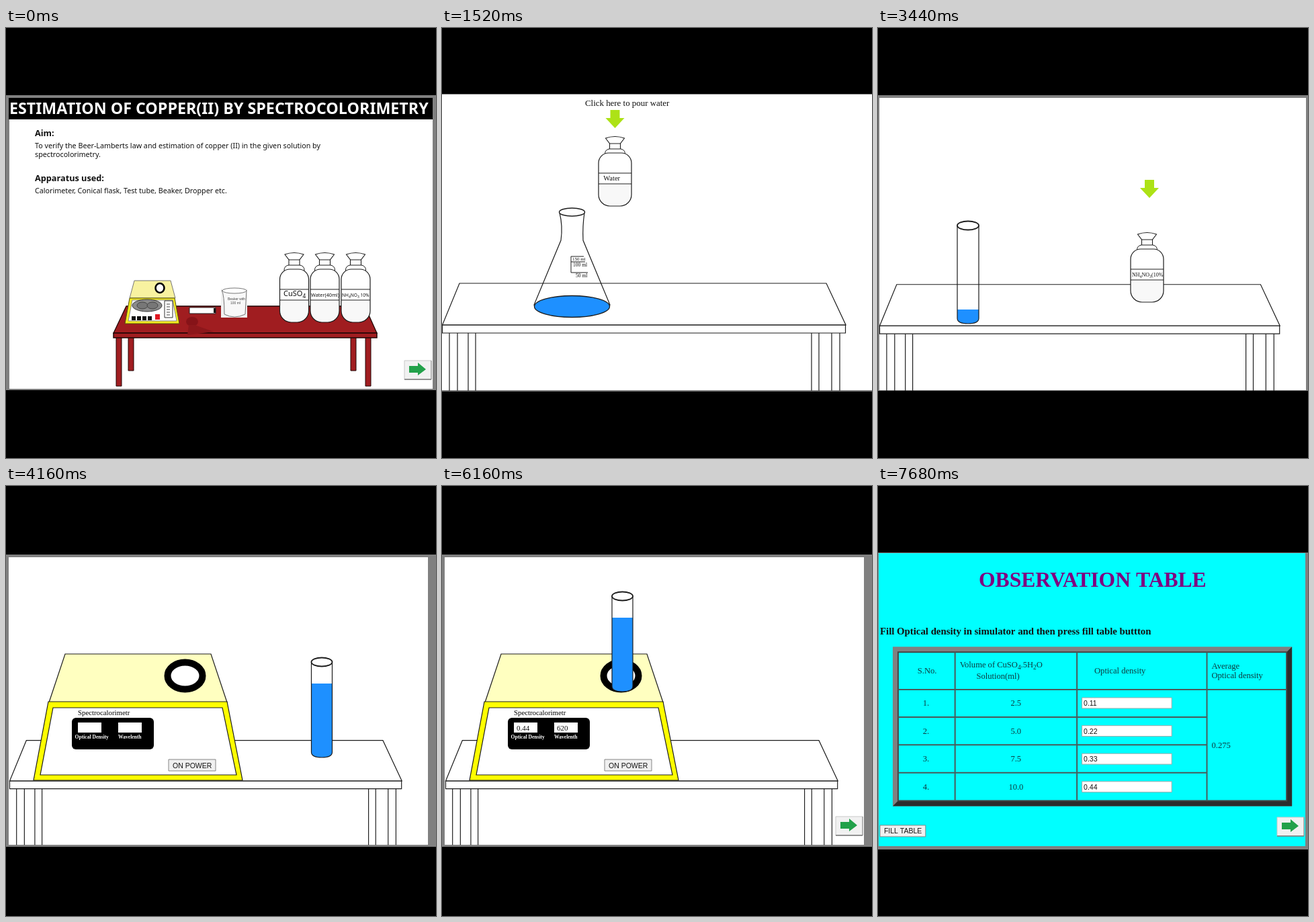
An HTML page with a canvas for the animation above (8000 ms loop, 640 by 640 pixels).

```html
<!DOCTYPE html>
<html lang="en">
<head>
<meta charset="utf-8">
<title>Spectrocolorimetry experiment</title>
<style>
html, body { margin: 0; width: 100%; height: 100%; overflow: hidden; background: #000; }
canvas { display: block; width: 640px; height: 640px; }
</style>
</head>
<body>
<canvas id="stage" width="640" height="640"></canvas>
<script>
const ctx = document.getElementById('stage').getContext('2d');
const SERIF = '"Liberation Serif", serif';
const SANS = '"Liberation Sans", sans-serif';
const NOTO = '"Noto Sans", sans-serif';
const BLUE = '#1e90ff', GRAY = '#808080', INK = '#1c1c1c';

function paint(fill, stroke, width = 1) {
  if (fill) { ctx.fillStyle = fill; ctx.fill(); }
  if (stroke) { ctx.strokeStyle = stroke; ctx.lineWidth = width; ctx.stroke(); }
}
function rect(x, y, w, h, fill, stroke, width) {
  ctx.beginPath(); ctx.rect(x, y, w, h); paint(fill, stroke, width);
}
function round(x, y, w, h, r, fill, stroke, width) {
  ctx.beginPath(); ctx.roundRect(x, y, w, h, r); paint(fill, stroke, width);
}
function poly(points, fill, stroke, width) {
  ctx.beginPath();
  points.forEach(([x, y]) => ctx.lineTo(x, y));
  ctx.closePath(); paint(fill, stroke, width);
}
function oval(x, y, rx, ry, fill, stroke, width) {
  ctx.beginPath(); ctx.ellipse(x, y, rx, ry, 0, 0, 7); paint(fill, stroke, width);
}
function line(x1, y1, x2, y2, color = INK, width = 1) {
  ctx.beginPath(); ctx.moveTo(x1, y1); ctx.lineTo(x2, y2); paint(null, color, width);
}
// "_4" sets the digit as a subscript.
function text(str, x, y, size, family, color = '#111', weight = '') {
  ctx.fillStyle = color;
  str.split(/_(\d)/).forEach((part, i) => {
    const sub = i % 2;
    ctx.font = `${weight} ${sub ? size * 0.75 : size}px ${family}`;
    ctx.fillText(part, x, y + (sub ? size * 0.25 : 0));
    x += ctx.measureText(part).width;
  });
}

// A page with a gray surround; the margins are the gray above and below it.
function windowArea(left, top, right, bottom, above, below, color = '#fff') {
  rect(0, top - above, 640, bottom - top + above + below, GRAY);
  rect(left, top, right - left, bottom - top, color);
}
function pointer(x, y, down = true) {
  const d = down ? 1 : -1;
  poly([[-7, 0], [7, 0], [7, 12], [14, 12], [0, 27], [-14, 12], [-7, 12]]
    .map(([dx, dy]) => [x + dx, y + d * dy]), '#ade216');
}
function nextButton(x, y) {
  rect(x, y, 40, 28, '#f1f1f1', '#c8c8c8');
  line(x, y + 28, x + 40, y + 28, '#777', 1.5);
  line(x + 40, y, x + 40, y + 28, '#888');
  poly([[7, 8], [20, 8], [20, 3], [32, 13], [20, 22], [20, 18], [7, 18]]
    .map(([dx, dy]) => [x + dx, y + dy]), '#22a14a');
}
function button(label, x, y, w) {
  rect(x, y, w, 17, '#f0f0f0', '#858585');
  text(label, x + 6, y + 12.5, 10.5, SANS);
}

function bottle(x, y, label, size, half = 24.5, family = SERIF, tilt = 0) {
  ctx.save();
  ctx.translate(x, y);
  ctx.rotate(tilt);
  const top = 24;
  ctx.beginPath();
  ctx.moveTo(-14, 2); ctx.quadraticCurveTo(0, -3, 14, 2);
  ctx.lineTo(8, 10); ctx.lineTo(8, 20); ctx.lineTo(-8, 20); ctx.lineTo(-8, 10);
  ctx.closePath(); paint('#fff', INK, 1.1);
  line(-8, 10, 8, 10);
  round(-15, 18, 30, 14, 7, '#fff', INK);
  round(-half, top, half * 2, 79, [15, 15, 17, 17], '#fff', INK, 1.2);
  round(-half + 2, 72, half * 2 - 4, 29, [0, 0, 15, 15], '#f8f8f8');
  line(-half, 54, half, 54);
  line(-half, 70, half, 70);
  ctx.beginPath(); ctx.rect(-half, 54, half * 2, 16); ctx.clip();
  text(label, -half + (half > 23 ? 2 : 1), 65, size, family);
  ctx.restore();
}
function tube(x, y, w, h, level) {
  const r = w / 2, base = y + h - 8;
  const shell = from => {
    ctx.beginPath();
    ctx.moveTo(x - r, from); ctx.lineTo(x - r, base);
    ctx.quadraticCurveTo(x - r, y + h, x, y + h);
    ctx.quadraticCurveTo(x + r, y + h, x + r, base);
    ctx.lineTo(x + r, from);
  };
  if (level) { shell(level); paint(BLUE); }
  shell(y); paint(null, INK, 1.2);
  oval(x, y, r, 6.5, '#fff', INK, 1.8);
}
function flask(fill) {
  const full = fill === 'full';
  const sides = () => {
    ctx.beginPath();
    ctx.moveTo(175, 275);
    ctx.quadraticCurveTo(180, 295, 177, 316);
    ctx.lineTo(137, 412);
    ctx.bezierCurveTo(140, 436, 246, 436, 250, 412);
    ctx.lineTo(210, 316);
    ctx.quadraticCurveTo(209, 295, 212, 275);
  };
  if (full) {
    ctx.save();
    sides(); ctx.clip();
    rect(120, 348.5, 150, 90, BLUE);
    ctx.restore();
  }
  sides(); paint(null, INK, 1.2);
  if (!full) oval(193.5, 414.5, 56, 16, fill ? BLUE : null, INK, 1.3);
  oval(193.5, 274, 19, 6, '#fff', INK, 1.4);
  line(192, 340, 192, 364);
  line(192, 340, 211, 340);
  line(192, 348, 213, 348);
  line(192, 364, 217, 364);
  if (full) text('200 ml', 190, 338, 9.5, SERIF);
  text('150 ml', 194, 346, 7, SERIF);
  text('100 ml', 195, 355, 7.5, SERIF);
  text('50 ml', 199, 371, 7.5, SERIF);
}
function bench() {
  poly([[26, 380], [572, 380], [601, 442], [0.5, 442]], null, INK, 1.2);
  rect(0.5, 442, 600, 12, null, INK, 1.2);
  for (const x of [11, 23, 39, 50, 550, 561, 580, 592]) line(x, 454, x, 540, INK, 1.2);
}
// Runs a drawing in bench coordinates, scaled into the window.
function zoom(scale, x, y, draw) {
  ctx.save();
  ctx.translate(x, y);
  ctx.scale(scale, scale);
  ctx.translate(0, -98);
  draw();
  ctx.restore();
}

function apparatus() {
  windowArea(5, 104, 635, 537, 4, 2);
  rect(4, 104, 631, 32, '#000');
  text('ESTIMATION OF COPPER(II) BY SPECTROCOLORIMETRY', 5, 128, 23.25, NOTO, '#fff', 'bold');
  text('Aim:', 43, 160.5, 12.7, NOTO, '#111', 'bold');
  text('To verify the Beer-Lamberts law and estimation of copper (II) in the given solution by', 43, 178.5, 10.72, NOTO);
  text('spectrocolorimetry.', 43, 192, 10.72, NOTO);
  text('Apparatus used:', 43, 228, 12.7, NOTO, '#111', 'bold');
  text('Calorimeter, Conical flask, Test tube, Beaker, Dropper etc.', 43, 246, 10.72, NOTO);

  const red = '#a01d20';
  for (const [x, bottom] of [[182, 510], [513, 510], [164, 533], [535, 533]])
    rect(x, 458, 8, bottom - 458, red, '#210606');
  poly([[179, 414], [534, 414], [552, 454], [160, 454]], red, '#210606', 1.3);
  rect(160, 454, 392, 7, red, '#210606', 1.5);
  oval(277, 437, 9, 7, '#861318');
  poly([[272, 442], [281, 442], [309, 452], [270, 457]], '#8d171b');

  poly([[191, 376], [245, 376], [252, 402], [184, 402]], '#f8f2a0', '#777');
  poly([[184, 402], [251, 402], [258, 440], [177, 440]], '#f3ea20', '#55510a');
  poly([[188, 405], [248, 405], [254, 436], [182, 436]], '#fff', '#888');
  oval(229, 387, 6.5, 7, '#fff', '#000', 2.6);
  oval(210, 413, 22, 9, '#8b8b8b', '#333');
  oval(203, 413, 8, 5, '#777', '#444');
  oval(218, 413, 8, 5, '#777', '#444');
  for (let i = 0; i < 4; i++) rect(187 + 8 * i, 429, 6, 6, '#111');
  rect(222, 426, 7, 8, '#e01822');
  rect(236, 406, 12, 25, '#fff', '#333');
  for (let y = 411; y < 429; y += 4) line(239, y, 244, y, '#444');

  rect(273, 416, 39, 9, '#fff', '#222');
  rect(309, 417, 3, 7, '#111');

  rect(320, 388, 39, 43, '#f1f1f1');
  ctx.beginPath();
  ctx.moveTo(321, 390); ctx.quadraticCurveTo(325, 397, 325, 426);
  ctx.quadraticCurveTo(340, 434, 356, 426); ctx.lineTo(358, 390);
  paint('#f8f8f8', '#777');
  oval(340, 391, 18, 4, '#fff', '#777');
  text('Beaker with', 330, 405, 5, SANS, '#444');
  text('100 ml', 334, 411, 5, SANS, '#444');

  bottle(429, 335, '', 11, 21.5);
  text('CuSO_4', 413, 399, 11, NOTO);
  bottle(474.5, 335, 'Water(40ml)', 7.3, 21.5, NOTO);
  bottle(520.5, 335, 'NH_4NO_3 10%', 6.6, 21.5, NOTO);
  nextButton(593, 495);
}

function flaskScene({ fill, label, caption, arrow }) {
  windowArea(0, 99, 640, 539, 1, 2);
  bench();
  flask(fill);
  bottle(257.5, 162, label, 10.5);
  if (caption) text(caption, 213, 116, 12.9, SERIF);
  if (arrow) pointer(257.5, 122);
}

function radio(x, y, on) {
  oval(x, y, 4.6, 4.6, '#fff', '#888');
  if (on) oval(x, y, 2.5, 2.5, '#333');
}
function question(answered) {
  windowArea(2, 104, 631, 534, 2, 3);
  zoom(0.974, 3, 103, () => { bench(); flask('full'); });
  ctx.save();
  ctx.shadowColor = '#0005'; ctx.shadowBlur = 4;
  rect(375, 234, 241, 222, '#fff', '#bbb');
  ctx.restore();
  rect(377, 236, 237, 29, '#e4e4e4', '#ccc');
  text('Question 1:-', 390, 255, 12.8, SANS, '#111', 'bold');
  rect(594, 243, 14, 15, '#f3f3f3', '#bbb');
  line(598.5, 248, 604, 254, '#555', 2);
  line(604, 248, 598.5, 254, '#555', 2);
  text('Why concentrated H_2S0_4 added?', 390, 295, 13, SANS, '#222');
  const rows = [
    ['it behave as much better', 326], ['to prevent precipitation of Cu(OH)_2', 356],
    ['to get the right experimental value', 374], ['None of these', 389.5]
  ];
  rows.forEach(([label, y], i) => {
    radio(399, y - 4.5, answered && i === 1);
    text(label, 406, y, 12.7, SANS, '#222');
  });
  text('conductor', 390, 341, 12.7, SANS, '#222');
  if (answered) {
    text('Your answer is right.Now proceed!', 390, 431, 12.8, SANS, '#111', 'bold');
    nextButton(590, 492);
  }
}

function tubeScene({ level, label, arrow, pour }) {
  windowArea(2, 104, 637, 539, 4, 1);
  zoom(0.992, 2, 102, bench);
  if (pour) line(134, 284, 134, level, BLUE, 2.5);
  tube(134, 294, 32, 146, level);
  if (pour) bottle(150, 272, label, 8, 24.5, SERIF, -1.9);
  else bottle(400.5, 305, label, 8);
  if (arrow) pointer(404, 226);
}

function meterScene({ placed, tip, density = '', wavelength = '', power, next }) {
  windowArea(4, 106, 628, 534, 4, 3);
  zoom(0.972, 5, 104.6, bench);
  poly([[88, 250], [305, 250], [329, 322], [64, 322]], '#ffffc0', INK, 1.2);
  poly([[63, 321], [329, 321], [352, 438], [41, 438]], '#ff0', INK, 1.2);
  poly([[70, 330], [322, 330], [343, 430], [51, 430]], '#fff', INK, 1.2);
  oval(266.5, 282.5, 26, 20, '#fff', '#000', 10);
  if (placed) tube(268.5, 164, 31, 142, 196);
  else tube(470, 262, 31, 142, 294);
  text('Spectrocalorimetr', 107, 340.5, 10.8, SERIF, '#000');
  round(98, 345, 122, 47, 6, '#000');
  rect(107, 352, 35, 15, '#fff');
  rect(167, 352, 35, 15, '#fff');
  text(density, 111, 363.5, 11, SERIF);
  text(wavelength, 171, 363.5, 11, SERIF);
  text('Optical Density', 102.5, 376, 7.6, SERIF, '#fff', 'bold');
  text('Wavelenth', 167, 376, 7.6, SERIF, '#fff', 'bold');
  button('ON POWER', 242, 407, 70);
  if (tip) pointer(470, 222);
  if (power) {
    pointer(278, 471, false);
    text('Click here to power on', 231, 488, 12.5, SERIF);
  }
  if (next) nextButton(586, 492);
}

function tableSheet(values, average) {
  text('OBSERVATION TABLE', 150.5, 153, 31.7, SERIF, '#800080', 'bold');
  text('Fill Optical density in simulator and then press fill table buttton', 3, 224.5, 14.85, SERIF, '#111', 'bold');
  rect(22, 243, 596, 238, GRAY);
  poly([[618, 243], [618, 481], [22, 481], [30, 473], [610, 473], [610, 251]], '#2c2c2c');
  rect(30, 251, 580, 222, '#0ff', '#444', 2);
  const edge = '#4a5a5a';
  for (const x of [115, 297, 491]) line(x, 251, x, 473, edge, 2);
  line(30, 307, 610, 307, edge, 2);
  for (const y of [348, 389.5, 431]) line(30, y, 491, y, edge, 2);
  const cell = (str, x, y) => text(str, x, y, 12.6, SERIF, '#0d3a3f');
  cell('S.No.', 59, 283);
  cell('Volume of CuSO_4.5H_2O', 122, 274);
  cell('Solution(ml)', 147, 291);
  cell('Optical density', 323, 283);
  cell('Average', 498, 276);
  cell('Optical density', 498, 290);
  ['2.5', '5.0', '7.5', '10.0'].forEach((volume, i) => {
    const y = 327 + i * 41.7;
    cell(`${i + 1}.`, 67, y + 4);
    cell(volume, i === 3 ? 195 : 198, y + 4);
    rect(304.5, y - 8, 134, 16, '#fff', '#9aa');
    text(values[i] || '', 307, y + 4, 10.5, SANS);
  });
  if (average) cell('0.275', 498, 394);
  button('FILL TABLE', 3, 509.5, 68);
}
function emptyTable(values = []) {
  windowArea(2, 104, 638, 539, 4, 1, '#0ff');
  tableSheet(values);
}
function filledTable(values, done) {
  windowArea(1, 100, 636, 536, 1, 5, '#0ff');
  ctx.save();
  ctx.translate(0, -3);
  ctx.scale(0.997, 0.997);
  tableSheet(values, done);
  ctx.restore();
  if (done) nextButton(594, 493);
}

const readings = ['0.11', '0.22', '0.33', '0.44'];
const water = { fill: 'base', label: '  Water', caption: 'Click here to pour water' };
const salt = 'NH_4NO_3(10%)';
const scenes = [
  [0, apparatus],
  [320, () => flaskScene({ label: '  CuSO_4', arrow: true })],
  [720, () => flaskScene({ label: '  CuSO_4', fill: 'base' })],
  [1120, () => flaskScene(water)],
  [1520, () => flaskScene({ ...water, arrow: true })],
  [1920, () => question(false)],
  [2240, () => question(true)],
  [2640, () => tubeScene({ label: '   CuSO_4', arrow: true })],
  [3040, () => tubeScene({ label: '   CuSO_4', level: 419, pour: true })],
  [3440, () => tubeScene({ label: salt, level: 419, arrow: true })],
  [3840, () => tubeScene({ label: salt, level: 328, pour: true })],
  [4160, () => meterScene({})],
  [4560, () => meterScene({ tip: true })],
  [4960, () => meterScene({ placed: true, power: true })],
  [5360, () => meterScene({ placed: true, wavelength: '620' })],
  [5760, () => meterScene({ placed: true, wavelength: '620', density: '0.11' })],
  [6160, () => meterScene({ placed: true, wavelength: '620', density: '0.44', next: true })],
  [6480, () => emptyTable()],
  [6880, () => emptyTable(readings.slice(0, 2))],
  [7280, () => filledTable(readings, false)],
  [7680, () => filledTable(readings, true)]
];

function frame() {
  const time = performance.now() % 8000;
  rect(0, 0, 640, 640, '#000');
  scenes.findLast(([start]) => start <= time)[1]();
  requestAnimationFrame(frame);
}
frame();
</script>
</body>
</html>
```
